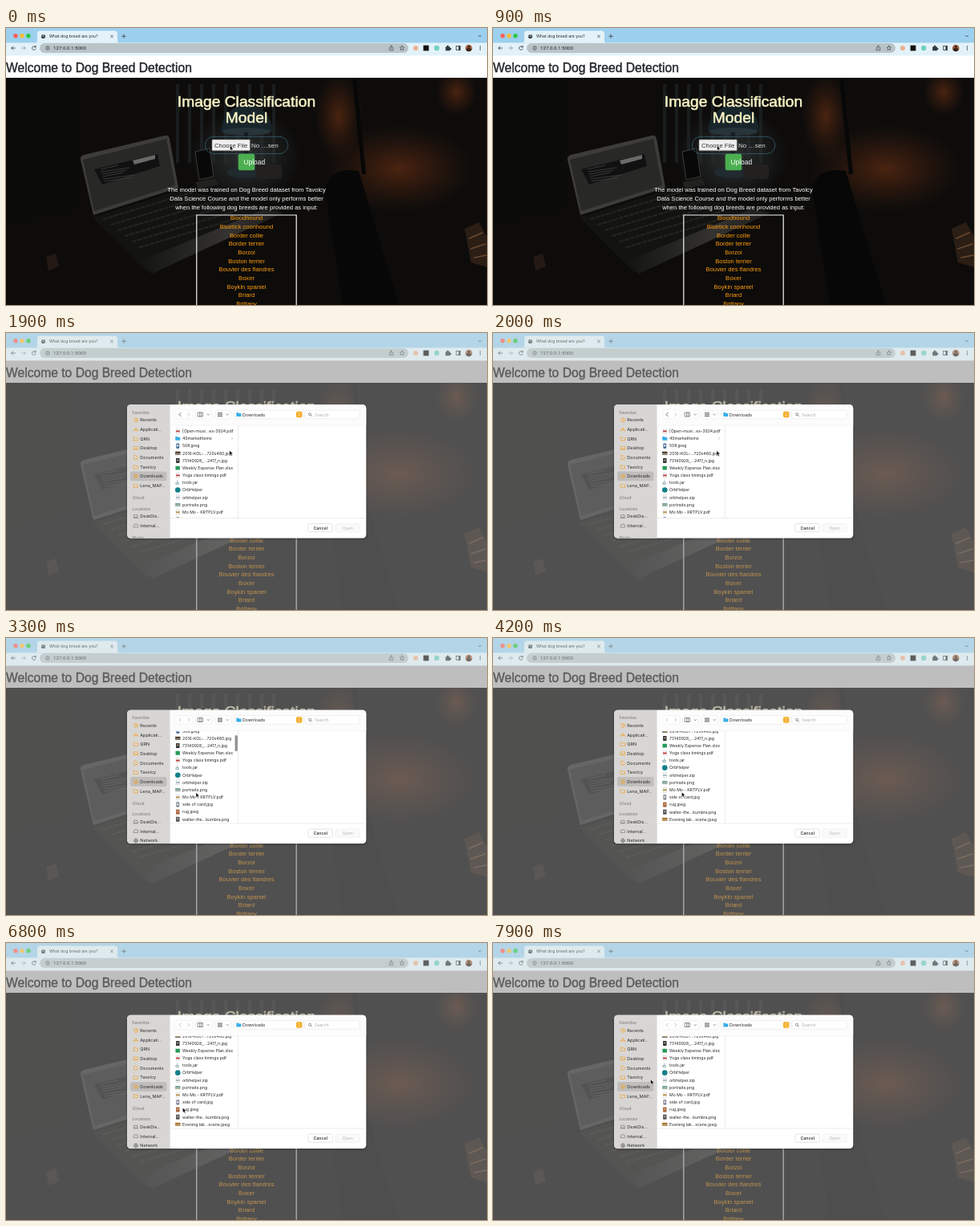
Write an HTML page that moves like this. It is 600 px wide and 345 px high and loops after 8000 ms.

```html
<!DOCTYPE html>
<html lang="en">
<head>
<meta charset="utf-8">
<title>Dog breed upload</title>
<style>
html, body { margin: 0; width: 100%; height: 100%; overflow: hidden; background: #0d0c0b; }
svg { display: block; width: 100vw; height: 100vh; }
text { white-space: pre; }
.page { font-family: "Liberation Sans", Arial, sans-serif; }
.ui { font-family: Inter, Roboto, sans-serif; }
</style>
</head>
<body>
<svg id="stage" viewBox="0 0 600 345" xmlns="http://www.w3.org/2000/svg"></svg>
<script>
const LOOP = 8000, OPEN = 1900;

// Markup helpers; text is placed by its vertical centre.
const tag = (name, attrs, body = '') =>
  `<${name} ${Object.entries(attrs).map(([k, v]) => `${k}="${v}"`).join(' ')}>${body}</${name}>`;
const rect = (x, y, width, height, fill, more = {}) => tag('rect', { x, y, width, height, fill, ...more });
const dot = (cx, cy, r, fill, more = {}) => tag('circle', { cx, cy, r, fill, ...more });
const oval = (cx, cy, rx, ry, fill) => tag('ellipse', { cx, cy, rx, ry, fill });
const path = (d, fill, more = {}) => tag('path', { d, fill, ...more });
const line = (d, stroke, width = 0.7, more = {}) =>
  path(d, 'none', { stroke, 'stroke-width': width, 'stroke-linecap': 'round', 'stroke-linejoin': 'round', ...more });
const text = (x, y, size, fill, str, more = {}) =>
  tag('text', { x, y: (y + size * 0.355).toFixed(2), 'font-size': size, fill, ...more }, str);
const centred = (y, size, fill, str) => text(300, y, size, fill, str, { 'text-anchor': 'middle' });
const group = (attrs, ...parts) => tag('g', attrs, parts.join(''));

const defs = `<defs>
  <radialGradient id="glow"><stop offset="0" stop-color="#2b2f30"/><stop offset="1" stop-color="#2b2f30" stop-opacity="0"/></radialGradient>
  <radialGradient id="warm"><stop offset="0" stop-color="#4a2410"/><stop offset="1" stop-color="#3a1c0e" stop-opacity="0"/></radialGradient>
  <linearGradient id="palm"><stop offset="0" stop-color="#141413"/><stop offset=".6" stop-color="#343331"/><stop offset="1" stop-color="#1d1c1b"/></linearGradient>
  <filter id="soft"><feGaussianBlur stdDeviation=".7"/></filter>
  <clipPath id="photoClip"><rect y="62" width="600" height="283"/></clipPath>
  <clipPath id="boxClip"><rect x="238" y="233.5" width="124" height="112"/></clipPath>
  <clipPath id="sheetClip"><rect x="151" y="89.7" width="298.3" height="166.4" rx="4.5"/></clipPath>
  <clipPath id="listClip"><rect x="205" y="116" width="84" height="114.6"/></clipPath>
</defs>`;

function photo() {
  let keys = '', folds = '', code = '';
  for (let i = 0; i < 6; i++) {
    keys += line(`M${122 + i * 9} ${238 + i * 7}l${112 + i * 4} ${-34 - i}`, '#242321', 2.2, { 'stroke-dasharray': '4 3' });
    code += line(`M${118 + i} ${176 + i * 3}l${22 + (i * 13) % 18} ${-5}`, '#454544', 0.8);
  }
  for (let i = 0; i < 9; i++) folds += rect(212 + i * 15, 70, 4, 98, '#191d1e');
  return group({ 'clip-path': 'url(#photoClip)' },
    rect(0, 62, 600, 283, '#0d0c0b'),
    group({ filter: 'url(#soft)' },
      folds,
      oval(298, 160, 70, 60, 'url(#glow)'),
      oval(415, 110, 30, 55, 'url(#warm)'), oval(562, 80, 26, 30, 'url(#warm)'), oval(490, 175, 95, 55, 'url(#warm)'),
      path('M0 62H88V225L0 245Z', '#0b0b0a'),
      // laptop
      path('M93 164Q92 160 97 158L198 134Q203 133 204 138L215 199L109 233Z', '#3d3c3a'),
      path('M96 164L200 138L211 196L110 228Z', '#282827'),
      path('M110 176L189 157L192 172L120 195Z', '#111'),
      path('M158 165L186 158V163L160 170Z', '#6a6a68'), code,
      path('M108 236L216 202L346 226L176 304Z', '#131312'), keys,
      path('M168 290L322 226L346 230L182 306Z', 'url(#palm)'),
      // phone, lamp and mug
      path('M236 154L254 150L259 185L241 189Z', '#080808', { stroke: '#42423f', 'stroke-width': 0.9 }),
      path('M236 192l25-5 4 8-25 6z', '#22211f'),
      path('M268 128Q272 98 300 96Q330 98 332 128Q300 140 268 128Z', '#18262c'),
      oval(300, 129, 30, 5, '#27343a'), rect(297, 130, 5, 42, '#151d20'),
      oval(300, 180, 24, 7, '#202a2f'), rect(312, 170, 32, 18, '#22211f', { rx: 3 }),
      // chair and things on the right
      path('M398 200Q405 172 440 178L490 345H420Z', '#070707'),
      path('M432 62H437L449 182H444Z', '#070707'),
      path('M50 285l12-4 4 16-13 5z', '#241a13'),
      path('M572 250l18-8 10 18v38l-20-6z', '#2b1e15'),
      line('M578 262l16-7M580 275l18-6M584 286l15-3', '#6a4a31', 1.5)));
}

const breeds = ['Bloodhound', 'Bluetick coonhound', 'Border collie', 'Border terrier', 'Borzoi', 'Boston terrier',
  'Bouvier des flandres', 'Boxer', 'Boykin spaniel', 'Briard', 'Brittany'];

function page() {
  const note = ['The model was trained on Dog Breed dataset from Tavolcy',
    'Data Science Course and the model only performs better',
    'when the following dog breeds are provided as input:'];
  return group({ class: 'page' },
    rect(0, 34, 600, 28, '#fff'),
    text(0, 49.7, 15.65, '#212529', 'Welcome to Dog Breed Detection', { stroke: '#212529', 'stroke-width': 0.4 }),
    photo(),
    group({ stroke: '#f8f3c4', 'stroke-width': 0.55 },
      centred(91.5, 19.25, '#f8f3c4', 'Image Classification'), centred(111.5, 19.25, '#f8f3c4', 'Model')),
    rect(248.4, 135.4, 103.4, 21.2, 'none', { rx: 10.6, stroke: '#35626c', 'stroke-width': 0.8 }),
    rect(257, 139, 47.3, 13.8, '#efefef', { rx: 1, stroke: '#777', 'stroke-width': 0.5 }),
    text(260, 146, 7.75, '#333', 'Choose File'),
    text(306, 146, 8.1, '#d8d8d8', 'No …sen'),
    rect(289.7, 156.7, 20.6, 20.6, '#4caf50', { rx: 2.5 }),
    text(296.5, 167, 8.4, '#fff', 'Upload'),
    note.map((s, i) => centred(201.5 + i * 10.7, 7.6, '#fff', s)).join(''),
    path('M237.8 345V233H362.2V345', 'none', { stroke: '#f4f4f4', 'stroke-width': 1.2 }),
    group({ 'clip-path': 'url(#boxClip)' },
      breeds.map((s, i) => centred(236.6 + i * 10.66, 7.6, '#ff9c0c', s)).join('')));
}

function browser() {
  const ink = '#33383c', pale = '#e3f2f9';
  return group({ class: 'ui' },
    rect(0, 0, 600, 19, '#9dcfee'),
    ['#fe5f57', '#febc2e', '#28c840'].map((c, i) => dot(12 + i * 8, 9.7, 2.7, c)).join(''),
    path('M36 18.5Q39 18.5 39 15V7Q39 3.5 42.5 3.5H135.5Q139 3.5 139 7V15Q139 18.5 142 18.5Z', pale),
    dot(46.5, 10.5, 2.6, ink), line('M44.5 10h2l1.3 1.5M46 8.4l1.5.8', pale, 0.6),
    text(54, 10.4, 5.1, '#222', 'What dog breed are you?'),
    line('M130.6 9l2.8 2.8M133.4 9l-2.8 2.8M144.7 10.3h4.6M147 8v4.6', ink),
    line('M589.3 9.3l1.7 1.7 1.7-1.7', ink),
    rect(0, 18.4, 600, 16, pale),
    line('M11.5 25H6.7M8.8 22.9L6.7 25l2.1 2.1', ink, 0.8),
    line('M19.5 25h4.8M22.2 22.9l2.1 2.1-2.1 2.1', '#8f999f', 0.8),
    line('M37 23.7a2.4 2.4 0 1 0 .2 2.3M37.2 22.2v1.7h-1.7', ink, 0.8),
    rect(42, 19, 460, 12, '#bac4c8', { rx: 6 }),
    dot(52, 25, 2.3, 'none', { stroke: ink, 'stroke-width': 0.6 }), line('M52 24.8v1.4M52 23.7v.1', ink),
    text(59, 25, 6.15, '#1c1f21', '127.0.0.1:5000', { 'font-family': 'Roboto, sans-serif' }),
    line('M479 24.4h-.7v3.3h4.6v-3.3h-.7M480.6 26v-4M479.2 23.2l1.4-1.4 1.4 1.4', ink, 0.6),
    line('M494 22l.9 1.9 2 .2-1.5 1.4.4 2.1-1.8-1-1.8 1 .4-2.1-1.5-1.4 2-.2z', ink, 0.6),
    dot(511, 25, 3.1, '#eeb18f'), rect(520.6, 21.6, 6.8, 6.8, '#111'),
    dot(537.3, 25, 3.2, '#6fd0c0'),
    path('M548.3 23.3h1.7a1.2 1.2 0 1 1 2.1 0h1.8v1.7a1.2 1.2 0 1 1 0 2.1v1.2h-5.6z', ink),
    rect(561.7, 22.4, 5, 5.2, 'none', { stroke: ink, 'stroke-width': 0.8 }), rect(564.5, 22.4, 2.2, 5.2, ink),
    dot(577.3, 25, 4.3, '#a5623f'), path('M573.5 27q3.8-4.5 7.6 0q-3.8 4.6-7.6 0z', '#35241d'), dot(577.3, 23.5, 1.4, '#35241d'),
    [-2, 0, 2].map(d => dot(591.5, 25 + d, 0.65, ink)).join(''));
}

// name, icon kind, icon colour
const files = [
  ['[Open-musi…es-3924.pdf', 'doc', '#b4473c'], ['40marketItems', 'folder', '#38aee8'],
  ['508.jpeg', 'phone', '#35618f'], ['2016-KOL-…720x480.jpg', 'wide', '#4d4339'],
  ['73140928_…2417_n.jpg', 'tall', '#333'], ['Weekly Expense Plan.xlsx', 'square', '#279a59'],
  ['Yoga class timings.pdf', 'doc', '#c23b37'], ['tools.jar', 'cup', '#7b9a98'],
  ['OrbHelper', 'disc', '#13808a'], ['orbhelper.zip', 'doc', '#a9b6c2'],
  ['portraits.png', 'wide', '#7ba7a0'], ['Mo Mo - KRTPLV.pdf', 'doc', '#b39145'],
  ['side of card.jpg', 'phone', '#777c86'], ['rug.jpeg', 'tall', '#a8673d'],
  ['walter-the…kumbra.png', 'tall', '#50555c'], ['Evening lak…scene.jpeg', 'wide', '#a87938']];

function fileIcon(kind, c, x, y) {
  switch (kind) {
    case 'folder': return path(`M${x - 3} ${y - 2.4}h2.3l.7.8h3v4h-6z`, c);
    case 'disc': return dot(x, y, 3.3, c);
    case 'square': return rect(x - 2.8, y - 2.4, 5.4, 4.8, c, { rx: 0.6 });
    case 'wide': return rect(x - 3.2, y - 2.1, 6.4, 4.2, c) + rect(x - 3.2, y + 0.5, 6.4, 0.9, '#d8c5a4');
    case 'tall': return rect(x - 2.2, y - 3, 4.4, 6, c) + dot(x, y - 0.5, 1, '#d5ae91');
    case 'phone': return rect(x - 1.9, y - 3.1, 3.8, 6.2, c, { rx: 0.6 }) + rect(x - 1, y - 1.8, 2, 3, '#d9e0e8');
    case 'cup': return line(`M${x - 2} ${y}h3v2h-3zM${x - 0.5} ${y - 1}v-1.5`, c, 0.8);
    default: return rect(x - 2.2, y - 3.1, 4.5, 6.2, '#f7f7f7', { stroke: '#c4c4c4', 'stroke-width': 0.4 }) +
      rect(x - 2.2, y - 0.8, 4.5, 1.9, c);
  }
}

function sideIcon(kind, x, y) {
  const c = '#f5a01d', box = `M${x - 2.5} ${y - 2}h2l.7.8h2.3v3.4h-5z`;
  const shapes = {
    clock: `M${x} ${y - 1.4}v1.6h1.2M${x + 2.5} ${y}a2.5 2.5 0 1 1-5 0a2.5 2.5 0 1 1 5 0z`,
    apps: `M${x - 2.2} ${y + 2}l2.2-4.2 2.2 4.2M${x - 2.7} ${y + 0.8}h5.4`,
    desk: `M${x - 2.6} ${y - 2}h5.2v3.7h-5.2zM${x - 2} ${y + 1}h4`,
    doc: `M${x - 1.8} ${y - 2.5}h2.2l1.4 1.4v3.6h-3.6z`,
    down: `M${x} ${y - 1.3}v2.5l-1-1m1 1l1-1M${x + 2.5} ${y}a2.5 2.5 0 1 1-5 0a2.5 2.5 0 1 1 5 0z`,
    laptop: `M${x - 2} ${y - 1.8}h4v3h-4zM${x - 3} ${y + 1.9}h6`,
    drive: `M${x - 2.6} ${y + 0.2}l.8-2h3.6l.8 2v1.6h-5.2z`,
    globe: `M${x + 2.5} ${y}a2.5 2.5 0 1 1-5 0a2.5 2.5 0 1 1 5 0zM${x - 2.5} ${y}h5M${x} ${y - 2.5}q-2 2.5 0 5q2-2.5 0-5`
  };
  return line(shapes[kind] || box, /laptop|drive|globe/.test(kind) ? '#74716e' : c, 0.65);
}

function sidebar() {
  const favourites = [['Recents', 'clock'], ['Applicati…', 'apps'], ['QRN', 'folder'], ['Desktop', 'desk'],
    ['Documents', 'doc'], ['Tavolcy', 'folder'], ['Downloads', 'down'], ['Lena_MAP…', 'folder']];
  const places = [['DeskDis…', 'laptop'], ['Internal…', 'drive']];
  const row = ([name, kind], y) => sideIcon(kind, 162, y) + text(167.3, y, 5.45, '#292827', name);
  const head = (y, s) => text(157.5, y, 4.8, '#8a8785', s, { 'font-weight': 600 });
  return group({},
    rect(151, 89, 53.7, 168, '#d8d6d5'),
    rect(155, 173, 45.5, 11.7, '#c0bebd', { rx: 2 }),
    head(99.6, 'Favorites'), head(206, 'iCloud'), head(219.4, 'Locations'),
    favourites.map((f, i) => row(f, 108.9 + i * 11.68)).join(''),
    places.map((p, i) => row(p, 229 + i * 11.6)).join(''),
    group({ id: 'media' }, head(256.2, 'Media')),
    group({ id: 'network' }, row(['Network', 'globe'], 252.4)));
}

function dialog() {
  const rows = files.map(([name, kind, c], i) => {
    const y = 122.7 + i * 9.17;
    return fileIcon(kind, c, 214.3, y) + text(220, y, 5.15, '#252525', name) +
      (kind === 'folder' ? line(`M281.5 ${y - 1.2}l1.1 1.2-1.1 1.2`, '#999', 0.5) : '');
  }).join('');
  const grey = '#666';
  let tiles = '';
  for (let i = 0; i < 9; i++) tiles += rect(264.2 + (i % 3) * 2, 99.3 + (i / 3 | 0) * 2, 1.5, 1.5, grey);
  return group({ class: 'ui' },
    rect(149.5, 89.5, 301.3, 169, '#000', { rx: 6, opacity: 0.13 }),
    rect(151, 89.7, 298.3, 166.4, '#fff', { rx: 4.5 }),
    group({ 'clip-path': 'url(#sheetClip)' },
      sidebar(),
      rect(204.7, 89, 245, 26.5, '#fcfcfc'),
      rect(212, 96.7, 21, 10.6, '#fff', { rx: 2, stroke: '#ececec', 'stroke-width': 0.5 }),
      line('M218 100l-2 2.1 2 2.1', '#444', 0.8, { id: 'back' }), line('M227 100l2 2.1-2 2.1', '#bbb', 0.8),
      rect(236.5, 96.7, 20, 10.6, '#fff', { rx: 2, stroke: '#e4e4e4', 'stroke-width': 0.5 }),
      line('M239.5 99.5h6v5h-6zM241.5 99.5v5M243.5 99.5v5M251 101.5l1.3 1.3 1.3-1.3', grey, 0.7),
      rect(260.7, 96.7, 20, 10.6, '#fff', { rx: 2, stroke: '#e4e4e4', 'stroke-width': 0.5 }),
      tiles, line('M275 101.5l1.3 1.3 1.3-1.3', grey),
      rect(284.7, 96.7, 86.3, 10.6, '#fff', { rx: 2, stroke: '#dedede', 'stroke-width': 0.5 }),
      fileIcon('folder', '#38aee8', 290.4, 102), text(295, 102.1, 5.35, '#252525', 'Downloads'),
      rect(362, 98.2, 7.4, 7.6, '#f4ac24', { rx: 1.7 }),
      line('M364.5 101.2l1.2-1.2 1.2 1.2M364.5 102.9l1.2 1.2 1.2-1.2', '#fff', 0.65),
      rect(373, 96.7, 68, 10.6, '#fff', { rx: 2, stroke: '#dedede', 'stroke-width': 0.5 }),
      dot(379, 101.7, 1.6, 'none', { stroke: grey, 'stroke-width': 0.65 }), line('M380.2 102.9l1.4 1.4', grey),
      text(385, 102.2, 5.3, '#aaa', 'Search'),
      rect(204.7, 115.3, 245, 0.4, '#e7e7e7'),
      group({ 'clip-path': 'url(#listClip)' }, group({ id: 'files' }, rows)),
      rect(289.2, 115.5, 0.6, 115.5, '#e0e0e0'), rect(204.7, 230.7, 245, 0.6, '#e0e0e0'),
      rect(285.6, 121, 3.2, 20, '#8f8f8f', { rx: 1.6, id: 'thumb' }),
      rect(377, 238, 30.3, 10.2, '#fff', { rx: 2, stroke: '#d4d4d4', 'stroke-width': 0.6 }),
      text(392.2, 243.2, 5.3, '#222', 'Cancel', { 'text-anchor': 'middle', 'font-weight': 500 }),
      rect(411, 238, 30.3, 10.2, '#fafafa', { rx: 2, stroke: '#e6e6e6', 'stroke-width': 0.5 }),
      text(426.2, 243.2, 5.3, '#b8b8b8', 'Open', { 'text-anchor': 'middle' })));
}

document.getElementById('stage').innerHTML = defs + page() + browser() +
  group({ id: 'dim' }, rect(0, 0, 600, 34.4, '#d4dcda', { opacity: 0.38 }), rect(0, 34.4, 600, 311, '#898989', { opacity: 0.55 })) +
  group({ id: 'sheet' }, dialog()) +
  path('M0 0V5.8L1.4 4.6L2.4 6.8L3.4 6.3L2.4 4.2H4.3Z', '#000', { id: 'cursor', stroke: '#fff', 'stroke-width': 0.45 });

const el = id => document.getElementById(id);
const [dim, sheet, list, thumb, cursor, media, network, back] =
  ['dim', 'sheet', 'files', 'thumb', 'cursor', 'media', 'network', 'back'].map(el);

// Eased interpolation through [time, ...values] stops.
function along(stops, t) {
  const i = stops.findIndex(s => s[0] > t);
  if (i < 0) return stops[stops.length - 1].slice(1);
  if (i === 0) return stops[0].slice(1);
  const a = stops[i - 1], b = stops[i], p = (t - a[0]) / (b[0] - a[0]), k = p * p * (3 - 2 * p);
  return a.slice(1).map((v, n) => v + (b[n + 1] - v) * k);
}

const pointer = [[0, 279.5, 146.6], [900, 279.5, 146.6], [1800, 278.7, 146], [2000, 279, 146.6], [2200, 279, 146.6],
  [2800, 237, 192.6], [4100, 237, 192.6], [5000, 191.6, 173], [5300, 191.6, 173], [5900, 205, 189],
  [6500, 205, 189], [6800, 220.6, 205.4], [7500, 220.6, 205.4], [7900, 196.6, 170]];
const scroll = [[2700, 0], [3300, 25.3], [3600, 34.4]];
const thumbFade = [[2600, 0], [2700, 1], [3800, 1], [4000, 0]];
const settle = [[2000, -0.5], [2300, 0]];

function draw(t) {
  const open = t >= OPEN, [x, y] = along(pointer, t), [s] = along(scroll, t);
  dim.style.display = sheet.style.display = open ? '' : 'none';
  sheet.setAttribute('transform', `translate(0 ${along(settle, t)[0]})`);
  list.setAttribute('transform', `translate(0 ${-s})`);
  thumb.setAttribute('y', 116.2 + s * 0.19);
  thumb.setAttribute('opacity', along(thumbFade, t)[0]);
  media.style.display = t < 2200 ? '' : 'none';
  network.style.display = t < 2200 ? 'none' : '';
  back.setAttribute('stroke', t < 2200 ? '#444' : '#bbb');
  cursor.setAttribute('transform', `translate(${x} ${y})`);
}

const start = performance.now();
function tick() {
  draw((performance.now() - start) % LOOP);
  requestAnimationFrame(tick);
}
tick();
</script>
</body>
</html>
```
